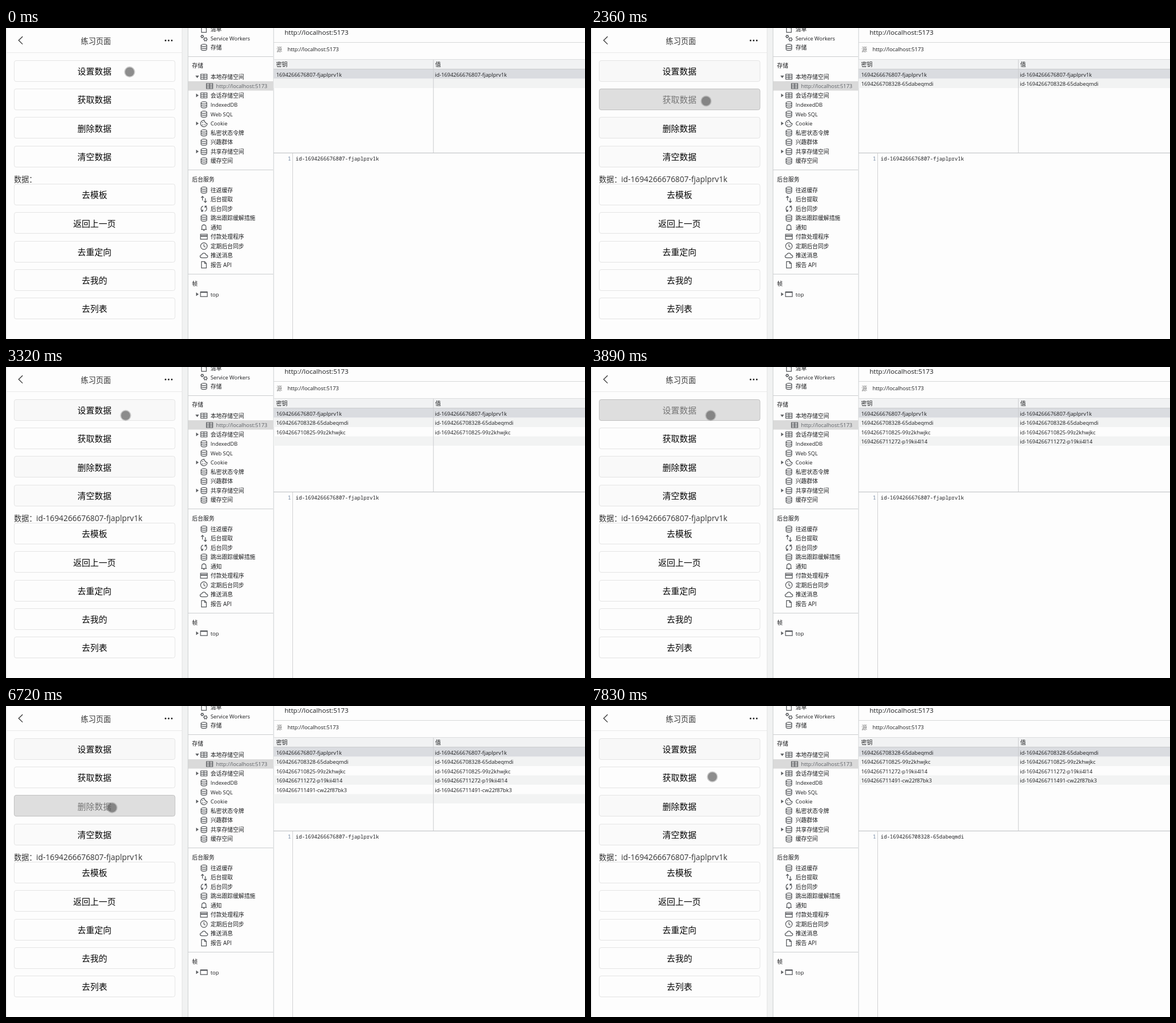
These frames come from a looping animation (1021 px wide and 549 px high, 8000 ms). An HTML page with a canvas:

```html
<!DOCTYPE html>
<html lang="zh-CN">
<head>
<meta charset="utf-8">
<title>练习页面</title>
<style>
html, body { margin: 0; width: 100%; height: 100%; overflow: hidden; background: #fdfdfd; }
canvas { display: block; }
</style>
</head>
<body>
<canvas id="stage" width="1021" height="549"></canvas>
<script>
const ctx = document.getElementById('stage').getContext('2d');
const LOOP = 8000;
const SANS = '"Open Sans", "Noto Sans CJK SC", "Noto Sans CJK", "Noto Sans CJK JP", sans-serif';
const MONO = '"Noto Sans Mono", "DejaVu Sans Mono", monospace';
const BG = '#fdfdfd', LINE = '#cbcdcf', INK = '#1b1c1e', ICON = '#505357';
const LATIN = 9.35, HAN = 9.9;
const URL_TEXT = 'http://localhost:5173';

const ids = [
  '1694266676807-fjaplprv1k',
  '1694266708328-65dabeqmdi',
  '1694266710825-99z2khwjkc',
  '1694266711272-p19kii4l14',
  '1694266711491-cw22f87bk3'
];
const addedAt = [0, 860, 3320, 3770, 3990];
const REMOVED_AT = 6770, READ_AT = 2360;

const buttons = [
  { label: '设置数据', y: 57, press: [[810, 890], [3260, 3320], [3650, 3770], [3880, 3990]], tint: [890, '#f8f8f8'] },
  { label: '获取数据', y: 107.2, press: [[2360, 2480]] },
  { label: '删除数据', y: 157.4, press: [[6720, 6860]], tint: [2360, '#f9f9f9'] },
  { label: '清空数据', y: 207.7, press: [], tint: [2360, '#fafafa'] },
  ...['去模板', '返回上一页', '去重定向', '去我的', '去列表']
    .map((label, i) => ({ label, y: 275.2 + i * 50.25, press: [] }))
];

// start, end, number of steps, target x, target y
const moves = [
  [1140, 1220, 3, 214, 88],
  [1410, 1660, 7, 203, 129],
  [2690, 2960, 7, 211, 85.5],
  [4080, 4440, 10, 187, 172],
  [4530, 4720, 6, 186, 181.5],
  [6030, 6030, 1, 187, 179.5],
  [7170, 7830, 15, 214, 125]
];

// label, y, icon, arrow
const items = [
  ['清单', 2, 'file'], ['Service Workers', 18, 'gears'], ['存储', 34, 'db'],
  ['本地存储空间', 86, 'grid', 'open'], ['会话存储空间', 119, 'grid', 'shut'],
  ['IndexedDB', 135.5, 'db'], ['Web SQL', 152, 'db'], ['Cookie', 168.5, 'cookie', 'shut'],
  ['私密状态令牌', 185, 'db'], ['兴趣群体', 201.5, 'db'],
  ['共享存储空间', 218, 'db', 'shut'], ['缓存空间', 234.5, 'db'],
  ['往返缓存', 286, 'db'], ['后台提取', 302.5, 'updown'], ['后台同步', 319, 'sync'],
  ['跳出跟踪缓解措施', 335.5, 'db'], ['通知', 352, 'bell'], ['付款处理程序', 368.5, 'card'],
  ['定期后台同步', 385, 'clock'], ['推送消息', 401.5, 'cloud'], ['报告 API', 418, 'file'],
  ['top', 470, 'frame', 'shut']
];

function rect(x, y, w, h, color) {
  ctx.fillStyle = color;
  ctx.fillRect(x, y, w, h);
}

function text(str, x, y, size, color = INK, align = 'left', family = SANS) {
  ctx.font = `${size}px ${family}`;
  ctx.fillStyle = color;
  ctx.textAlign = align;
  ctx.fillText(str, x, y + size * 0.37);
}

function small(str, x, y, color) {
  text(str, x, y, /[\u4e00-\u9fff]/.test(str) ? HAN : LATIN, color);
}

function path(d) { ctx.stroke(new Path2D(d)); }

function ring(x, y, r) {
  ctx.beginPath();
  ctx.arc(x, y, r, 0, Math.PI * 2);
  ctx.stroke();
}

function disc(x, y, r) {
  ctx.beginPath();
  ctx.arc(x, y, r, 0, Math.PI * 2);
  ctx.fill();
}

const icons = {
  db() {
    ctx.beginPath();
    ctx.ellipse(0, -3.3, 5, 2, 0, 0, Math.PI * 2);
    ctx.stroke();
    path('M-5-3.3V3.6C-5 6.2 5 6.2 5 3.6V-3.3M-5 .2C-5 2.8 5 2.8 5 .2');
  },
  grid() { path('M-5.5-4.5H5.5V4.5H-5.5ZM-5.5-1.5H5.5M-5.5 1.5H5.5M0-4.5V4.5'); },
  file() { path('M-4.3-5.6H1.4L4.3-2.6V5.6H-4.3ZM1.2-5.6V-2.4H4.3'); },
  gears() {
    for (const [x, y, r] of [[-3, -3, 1.8], [2.8, 2, 2.5]]) {
      ring(x, y, r);
      for (let i = 0; i < 6; i++) {
        const a = i * Math.PI / 3;
        ctx.beginPath();
        ctx.moveTo(x + Math.cos(a) * r, y + Math.sin(a) * r);
        ctx.lineTo(x + Math.cos(a) * (r + 1.4), y + Math.sin(a) * (r + 1.4));
        ctx.stroke();
      }
    }
  },
  cookie() {
    path('M.5-5.7A5.8 5.8 0 1 0 5.8 0C4 .5 3-.5 3.2-2C1.3-2 .2-3.5.5-5.7Z');
    for (const [x, y] of [[-2.2, -1.7], [-1.8, 2.3], [1.8, 2.2]]) disc(x, y, 0.9);
  },
  updown() { path('M-2.5 2V-5.2M-5-2.8L-2.5-5.3L0-2.8M2.5-2V5.2M0 2.8L2.5 5.3L5 2.8'); },
  sync() { path('M-1.5-4.6C-6-3-6 3-2.2 4.4M-5 4.6H-2V1.6M1.5 4.6C6 3 6-3 2.2-4.4M5-4.6H2V-1.6'); },
  bell() { path('M-5 3.6H5M-3.6 3.6V-1C-3.6-5.5 3.6-5.5 3.6-1V3.6M0-4.4V-5.8M-1.2 5.4H1.2'); },
  card() {
    path('M-6-4.4H6V4.4H-6Z');
    ctx.fillRect(-6, -2.4, 12, 2.2);
  },
  clock() {
    ring(0, 0, 5.8);
    path('M0-3.6V.2L2.6 2');
  },
  cloud() { path('M-3.8 4.2C-7.8 4-7.5-1-3.8-1C-3-5.2 3-5.4 3.8-.8C7.6-.6 7.6 4.2 4 4.2Z'); },
  frame() {
    path('M-6-4.2H6V4.2H-6Z');
    ctx.fillRect(-6, -4.4, 12, 1.8);
  }
};

function icon(name, x, y) {
  ctx.save();
  ctx.translate(x, y);
  ctx.strokeStyle = ctx.fillStyle = ICON;
  ctx.lineWidth = 1.2;
  icons[name]();
  ctx.restore();
}

function arrow(y, open) {
  ctx.fillStyle = '#606366';
  ctx.fill(new Path2D(open
    ? `M334 ${y - 2}h6.4l-3.2 4.6Z`
    : `M335.2 ${y - 3.2}v6.4l4.6-3.2Z`));
}

function drawPhone(t) {
  rect(0, 0, 1.5, 549, '#ebecec');
  rect(310, 0, 11, 549, '#f1f2f2');
  rect(310, 0, 1, 549, '#e4e5e5');
  rect(1, 43, 309, 1, '#e9e9e9');
  ctx.strokeStyle = '#333';
  ctx.lineWidth = 1.3;
  path('M29.3 15L22.3 21.8L29.3 28.6');
  ctx.fillStyle = '#222';
  for (const x of [281.3, 286.8, 292.3]) disc(x, 22, 1.5);
  text('练习页面', 158.5, 22.7, 13.3, '#333', 'center');

  for (const b of buttons) {
    const down = b.press.some(([from, to]) => t >= from && t < to);
    const rest = b.tint && t >= b.tint[0] ? b.tint[1] : BG;
    ctx.beginPath();
    ctx.roundRect(14.5, Math.round(b.y) + 0.5, 283.5, 37, 3.5);
    ctx.fillStyle = down ? '#dedede' : rest;
    ctx.fill();
    ctx.strokeStyle = down ? '#c0c0c0' : '#e4e4e4';
    ctx.lineWidth = 1;
    ctx.stroke();
    text(b.label, 156, b.y + 19.6, 15, down ? '#777' : '#080808', 'center');
  }
  text('数据：', 14, 267.5, 13.3, '#333');
  if (t >= READ_AT) text('id-' + ids[0], 53.3, 267.3, 13.8, '#333');
}

function drawSidebar() {
  rect(321, 94, 150, 16.5, '#dadada');
  rect(320.5, 0, 1, 549, LINE);
  rect(471.4, 0, 1, 549, LINE);
  for (const y of [50, 250, 434]) rect(321, y, 150, 1, LINE);
  small('存储', 328, 66.5);
  small('后台服务', 328, 267);
  small('帧', 328, 451);
  for (const [label, y, name, fold] of items) {
    if (fold) arrow(y, fold === 'open');
    icon(name, 349, y);
    small(label, 360.7, y + 0.3);
  }
  icon('grid', 359, 102.5);
  small(URL_TEXT, 370.4, 102.7, '#5f6368');
}

function drawStorage(t) {
  text(URL_TEXT, 491.2, 7.4, 11.65);
  rect(472, 25, 549, 1, '#d6d7d8');
  small('源', 477, 38, '#777');
  small(URL_TEXT, 496.4, 38);

  rect(472, 55, 549, 17.5, '#f1f2f3');
  rect(472, 55, 549, 1, '#dcddde');
  rect(472, 72, 549, 1, LINE);
  small('密钥', 476.5, 64.5);
  small('值', 757, 64.5);

  const rows = ids.filter((id, i) => t >= addedAt[i] && (i > 0 || t < REMOVED_AT));
  for (let i = 0; i <= rows.length; i++) {
    const y = 73 + i * 16.5;
    if (i === 0) rect(472, y, 549, 16.5, '#dadce0');
    else if (i % 2) rect(472, y, 549, 16.5, '#f2f3f3');
    if (!rows[i]) continue;
    small(rows[i], 476.4, y + 9.3);
    small('id-' + rows[i], 756.3, y + 9.3);
  }
  rect(753.2, 56, 1, 164, LINE);
  rect(472, 220, 549, 1.2, '#c4c6c8');
  rect(505, 221, 1, 328, '#d0d1d2');
  text('1', 502.5, 231, 9.07, '#6a7f9c', 'right', MONO);
  text('id-' + rows[0], 510.8, 231, 9.07, '#202124', 'left', MONO);
}

function pointer(t) {
  let x = 218, y = 77.5;
  for (const [from, to, steps, tx, ty] of moves) {
    if (t < from) break;
    const k = t >= to ? steps : Math.floor((t - from) / (to - from) * (steps - 1)) + 1;
    const p = (1 - Math.cos(Math.PI * k / steps)) / 2;
    x += (tx - x) * p;
    y += (ty - y) * p;
  }
  return [x, y];
}

function drawPointer(t) {
  const [x, y] = pointer(t);
  ctx.fillStyle = 'rgba(110,110,110,.32)';
  disc(x, y, 9.7);
  ctx.fillStyle = 'rgba(95,95,95,.58)';
  disc(x, y, 8);
}

function draw(t) {
  rect(0, 0, 1021, 549, BG);
  drawPhone(t);
  drawSidebar();
  drawStorage(t);
  drawPointer(t);
}

const start = performance.now();
function tick() {
  draw((performance.now() - start) % LOOP);
  requestAnimationFrame(tick);
}
tick();
</script>
</body>
</html>
```
